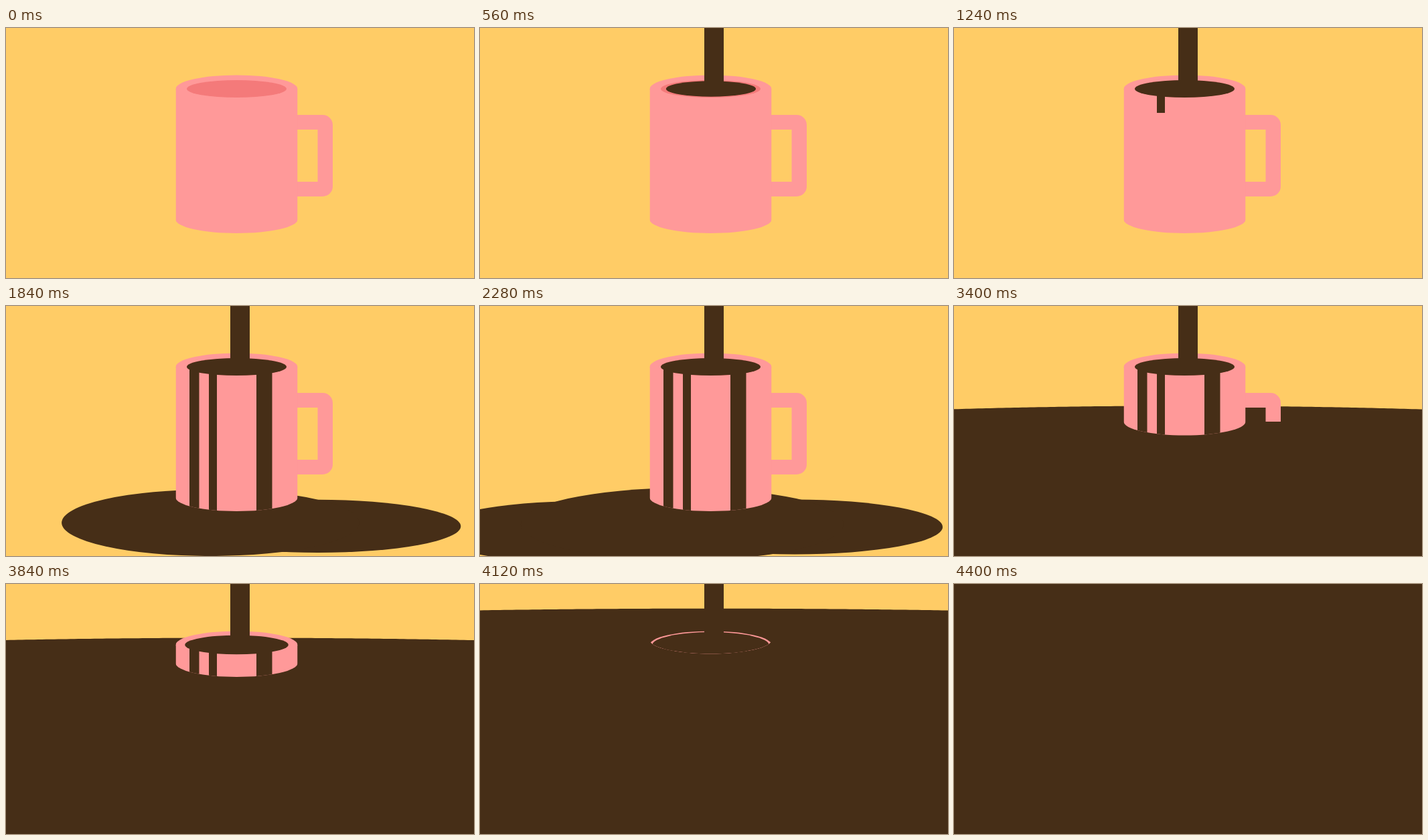
An HTML page with a canvas that plays this animation: 699 px wide and 374 px high, repeating every 4.88 s.

```html
<!DOCTYPE html>
<html lang="en">
<head>
<meta charset="utf-8">
<title>Overflowing mug</title>
<style>
  html, body { margin: 0; width: 100%; height: 100%; overflow: hidden; background: #fc6; }
  canvas { display: block; }
</style>
</head>
<body>
<canvas id="stage" width="699" height="374"></canvas>
<script>
const W = 699, H = 374, LOOP = 4880, STEP = 40;
const YELLOW = '#ffcc66', PINK = '#ff9999', INSIDE = '#f47a7a', COFFEE = '#462e17';
const MUG = { x: 344.5, top: 91, base: 286.5, rx: 91, ry: 20.5 };
const g = document.getElementById('stage').getContext('2d');

const ramp = (t, a, b) => Math.min(1, Math.max(0, (t - a) / (b - a)));
const mix = (a, b, k) => a + (b - a) * k;

function ellipse(color, x, y, rx, ry) {
  g.fillStyle = color;
  g.beginPath();
  g.ellipse(x, y, rx, ry, 0, 0, 2 * Math.PI);
  g.fill();
}

function rect(color, x, y, w, h) {
  g.fillStyle = color;
  g.fillRect(x, y, w, h);
}

function puddle(t, start, end, x, y, rx, ry) {
  const k = Math.sqrt(ramp(t, start, end));
  if (k) ellipse(COFFEE, mix(MUG.x, x, k), mix(300, y, k), rx * k, ry * k);
}

// Spilled coffee: three puddles that merge into a rising, slightly domed surface.
function spill(t) {
  puddle(t, 1560, 1860, 470, 330.5, 221, 41);
  puddle(t, 1880, 2280, 150, 338, 222, 46);
  const k = ramp(t, 2280, 2840);
  puddle(t, 1500, 1900, mix(302, 332, k), mix(326.3, 292, k), mix(241, 395, k), mix(54, 60, k));
  if (t < 2320) return;
  const top = 237 - 0.1565 * (t - 2840);
  const bend = 6.7e-5 * Math.exp(-8.4e-4 * (t - 2840)) + 8e-4 * (1 - ramp(t, 2340, 2640)) ** 2;
  g.fillStyle = COFFEE;
  g.beginPath();
  g.moveTo(0, H);
  for (let x = 0; x <= W + 6; x += 6) g.lineTo(x, top + bend * (x - 345) ** 2);
  g.lineTo(W + 6, H);
  g.fill();
}

function handle(level) {
  g.save();
  g.beginPath();
  g.rect(0, 0, W, level < MUG.base ? level : H);
  g.clip();
  g.fillStyle = PINK;
  g.beginPath();
  g.roundRect(420, 130, 68, 122, [0, 15, 15, 0]);
  g.rect(420, 152, 45.5, 78);
  g.fill('evenodd');
  g.restore();
}

function mug(t, level) {
  g.save();
  // Everything below the waterline is hidden.
  g.beginPath();
  g.moveTo(MUG.x - MUG.rx, 0);
  g.lineTo(MUG.x - MUG.rx, level);
  g.ellipse(MUG.x, level, MUG.rx, MUG.ry, 0, Math.PI, 0, true);
  g.lineTo(MUG.x + MUG.rx, 0);
  g.clip();

  ellipse(PINK, MUG.x, MUG.top, MUG.rx, MUG.ry);
  rect(PINK, MUG.x - MUG.rx, MUG.top, 2 * MUG.rx, H);
  ellipse(INSIDE, MUG.x, MUG.top, 74.5, 13);

  const pool = 0.9 * ramp(t, 160, 560) + 0.1 * ramp(t, 720, 920);
  const over = ramp(t, 3760, 4280);
  if (pool) ellipse(COFFEE, mix(349, MUG.x, pool), MUG.top, 74.5 * pool + 18 * over, 13 * pool + 8.5 * over);

  for (const [x, w, start] of [[303, 12, 1178], [374, 23.5, 1290], [274, 14.5, 1410]])
    if (t > start) rect(COFFEE, x, MUG.top, w, 0.58 * (t - start));
  g.restore();
}

function draw(t) {
  rect(YELLOW, 0, 0, W, H);
  const level = Math.min(MUG.base, 242.5 - 0.124 * (t - 2840));
  spill(t);
  handle(level);
  mug(t, level);
  rect(COFFEE, 335, 0, 29, 91 * ramp(t, 0, 160));
  if (t >= 4400) rect(COFFEE, 0, 0, W, H);
}

function frame() {
  draw(Math.floor(performance.now() % LOOP / STEP) * STEP);
  requestAnimationFrame(frame);
}
frame();
</script>
</body>
</html>
```
